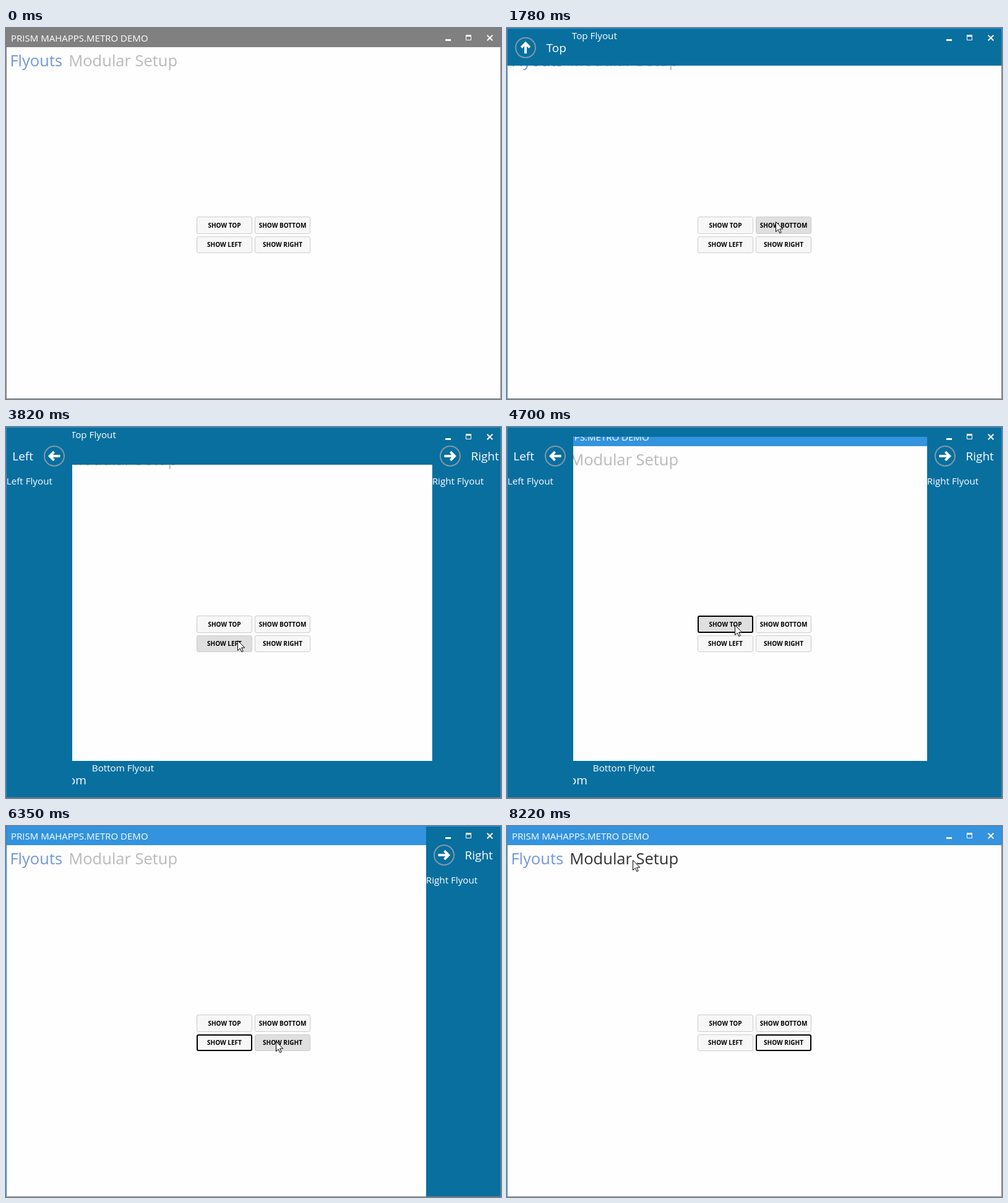
Recreate the animation shown at these times as an HTML page. Size 800 px wide and 600 px high, loop 8370 ms.

```html
<!DOCTYPE html>
<html lang="en">
<head>
<meta charset="utf-8">
<title>Flyouts demo</title>
<style>
  html, body { margin: 0; width: 100%; height: 100%; overflow: hidden; background: #fefefe; }
  svg { display: block; width: 800px; height: 600px; font-family: "Open Sans", "Noto Sans", sans-serif; }
  .title { font-size: 15px; fill: #fff; }
  .tab { font-size: 25.5px; }
  .button text { font-size: 10px; font-weight: 700; text-anchor: middle; }
  .flyout > rect { fill: #086f9f; }
  .flyout text { fill: #fff; font-size: 15.2px; font-weight: 500; }
  .flyout .head { font-size: 19px; }
</style>
</head>
<body>
<svg viewBox="0 0 800 600">
  <rect width="800" height="600" fill="#fefefe"/>
  <rect id="bar" width="800" height="31"/>
  <text class="title" x="8" y="22">PRISM MAHAPPS.METRO DEMO</text>
  <text class="tab" x="6.4" y="62" fill="#6f97dc">Flyouts</text>
  <text class="tab" id="modular" x="101.2" y="62">Modular Setup</text>
  <g id="buttons"></g>
  <g id="flyouts"></g>
  <g fill="none" stroke="#fff">
    <path d="M710 19.5h9" stroke-width="3"/>
    <path d="M743.5 12v7.5h8v-7.5"/>
    <path d="M743 12.5h9" stroke-width="3"/>
    <path d="M777.7 11.7l8.6 8.6m0-8.6l-8.6 8.6" stroke-width="2"/>
  </g>
  <path d="M799.5 31V599.5H0" fill="none" stroke="#808080"/>
  <path id="border" d="M.5 600V.5H799.5V31" fill="none"/>
  <g id="pointer">
    <circle id="click" r="12" fill="#e9e520" fill-opacity=".75"/>
    <path d="M.5 .5V16.5L4.2 13L6.8 18.6L9.2 17.5L6.7 12H11.8Z" fill="#fff" stroke="#000"/>
  </g>
</svg>
<script>
const LOOP = 8370, SLIDE = 750, TRAVEL = 500, DELAY = 100, PRESS = 70, LAG = 75;

// Where the pointer must be by a given time, and what it clicks there.
const stop = (at, x, y, target) => ({ at, x, y, target });
const stops = [
  stop(140, 619, 543),
  stop(1170, 368, 311, "Top"),
  stop(1950, 434, 313, "Bottom"),
  stop(2870, 354, 359, "Left"),
  stop(3510, 434, 350, "Right"),
  stop(3820, 374, 345),
  stop(4470, 352, 320, "Top"),
  stop(5040, 436, 320, "Bottom"),
  stop(5720, 368, 346, "Left"),
  stop(6510, 436, 348, "Right"),
  stop(7010, 423, 340),
  stop(8150, 203, 55, "Modular")
];
const clicks = stops.filter(s => s.target);

const panels = [
  { name: "Top", turn: 0, x: 1, y: 1, width: 798, height: 60 },
  { name: "Bottom", turn: 180, x: 1, y: 540, width: 798, height: 59 },
  { name: "Left", turn: -90, x: 1, y: 1, width: 106, height: 598 },
  { name: "Right", turn: 90, x: 679, y: 1, width: 120, height: 598 }
];

const $ = id => document.getElementById(id);

function set(el, attrs) {
  for (const key in attrs) el.setAttribute(key, attrs[key]);
}

function add(parent, tag, attrs, text = "") {
  const el = document.createElementNS("http://www.w3.org/2000/svg", tag);
  set(el, attrs);
  el.textContent = text;
  return parent.appendChild(el);
}

function makeButton(name, i) {
  const row = i >> 1;
  const box = { x: 308 + 94 * (i % 2), y: 305 + 32 * row, width: 90, height: 28 - row };
  const g = add($("buttons"), "g", { class: "button" });
  const rect = add(g, "rect", {});
  add(g, "text", { x: box.x + 45, y: box.y + 18 - row }, "SHOW " + name.toUpperCase());
  return { box, rect };
}

function makeFlyout({ name, turn, width, height }) {
  const g = add($("flyouts"), "g", { class: "flyout" });
  const side = height > width, headFirst = name === "Left";
  const iconX = headFirst ? width - 29 : 29, iconY = side ? 46 : 31;
  const headX = headFirst ? 9.3 : 62.5;
  add(g, "rect", { width, height });
  const icon = add(g, "g", { transform: `translate(${iconX} ${iconY}) rotate(${turn})`, fill: "none" });
  add(icon, "circle", { r: 16, stroke: "#8299a6", "stroke-width": 2 });
  add(icon, "path", { d: "M0 9.5V-6M-6.8-.4L0-7.2L6.8-.4", stroke: "#fff", "stroke-width": 4 });
  const head = add(g, "text", { class: "head", x: headX, y: iconY + 7 }, name);
  const bodyX = side ? -.2 : headX + head.getComputedTextLength() + 9;
  add(g, "text", { x: bodyX, y: side ? 92 : 17 }, name + " Flyout");
  return g;
}

for (const [i, p] of panels.entries()) {
  p.button = makeButton(p.name, i);
  p.flyout = makeFlyout(p);
  [p.open, p.close] = clicks.filter(c => c.target === p.name).map(c => c.at + DELAY);
}

const clamp = v => Math.min(1, Math.max(0, v));
const smooth = k => k * k * (3 - 2 * k);

function pointerAt(t) {
  const i = Math.max(1, stops.findIndex(s => s.at > t));
  const to = t >= stops.at(-1).at ? stops.at(-1) : stops[i];
  const from = stops[stops.indexOf(to) - 1];
  const start = from.at + (from.target ? DELAY : 0);
  const k = smooth(clamp((t - start) / Math.min(TRAVEL, to.at - start)));
  return { x: Math.round(from.x + (to.x - from.x) * k), y: Math.round(from.y + (to.y - from.y) * k) };
}

// Cubic Bezier (0.25, 1, 0.05, 1), solved by bisection.
function ease(x) {
  if (x <= 0 || x >= 1) return clamp(x);
  let low = 0, high = 1;
  for (let i = 0; i < 24; i++) {
    const s = (low + high) / 2, r = 1 - s;
    if (.75 * s * r * r + .15 * s * s * r + s ** 3 < x) low = s; else high = s;
  }
  return 1 - (1 - low) ** 3;
}

const inside = (p, b) => p.x >= b.x && p.x < b.x + b.width && p.y >= b.y && p.y < b.y + b.height;

function drawButton({ box, rect }, over, pressed, focused) {
  const line = focused ? 2 : 1;
  set(rect, {
    x: box.x + line / 2, y: box.y + line / 2,
    width: box.width - line, height: box.height - line, rx: 3 - line / 2,
    fill: !over ? "#f7f7f7" : pressed ? "#d5d5d5" : "#dfdfdf",
    stroke: focused ? "#000" : "#ccc", "stroke-width": line
  });
}

function drawFlyout(p, t) {
  const away = 1 - ease((t - p.open) / SLIDE) + ease((t - p.close) / SLIDE);
  const angle = p.turn * Math.PI / 180;
  const x = p.x + Math.sin(angle) * p.width * away;
  const y = p.y - Math.cos(angle) * p.height * away;
  set(p.flyout, { transform: `translate(${x} ${y})`, visibility: away > .999 ? "hidden" : "visible" });
}

function draw(t) {
  const frame = t < clicks[0].at ? "#808080" : "#3393df";
  set($("bar"), { fill: frame });
  set($("border"), { stroke: frame });

  const { x, y } = pointerAt(t), hover = pointerAt(t - LAG);
  const pressed = clicks.some(c => t >= c.at && t < c.at + PRESS);
  set($("pointer"), { transform: `translate(${x} ${y})`, visibility: t < stops[0].at ? "hidden" : "visible" });
  set($("click"), { opacity: pressed ? 1 : 0 });
  const onTab = inside(hover, { x: 103, y: 40, width: 174, height: 30 });
  set($("modular"), { fill: onTab ? "#303030" : "#bababa" });

  // An opening flyout takes the focus; a closing one leaves it on the button.
  const last = clicks.findLast(c => c.at <= t && c.target !== "Modular");
  for (const p of panels) {
    const opened = t >= p.open && t < p.close - DELAY;
    drawButton(p.button, inside(hover, p.button.box), pressed, last?.target === p.name && !opened);
    drawFlyout(p, t);
  }
}

const begin = performance.now();
function tick() {
  draw((performance.now() - begin) % LOOP);
  requestAnimationFrame(tick);
}
tick();
</script>
</body>
</html>
```
